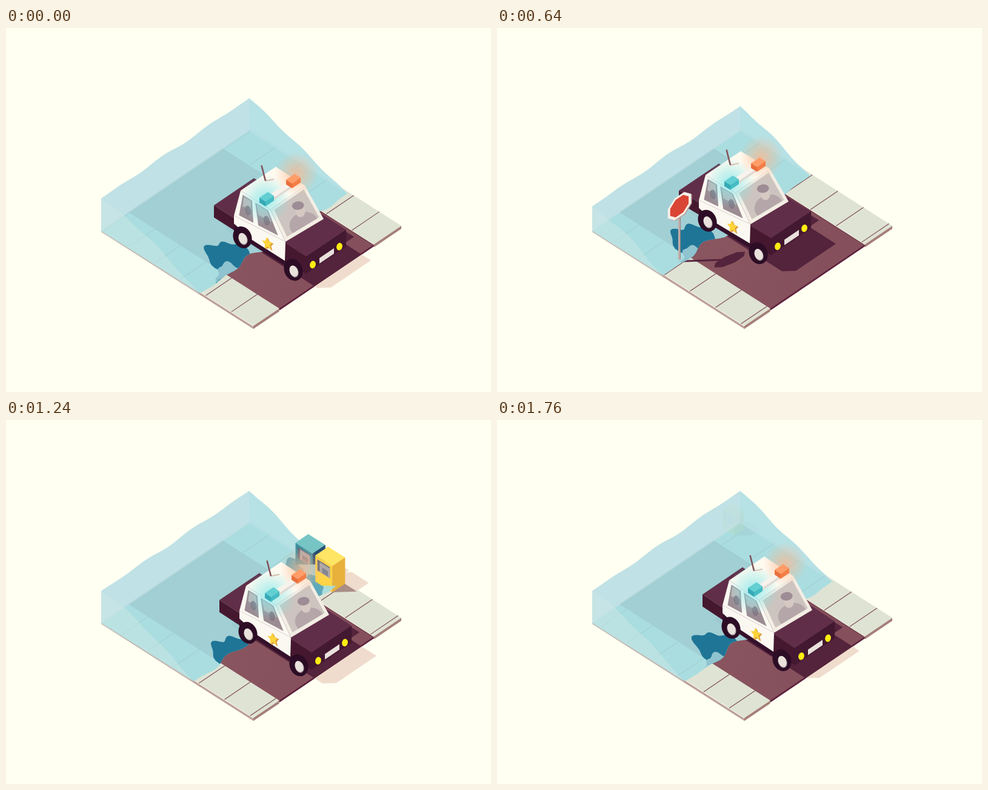
These frames come from a looping animation (800 px wide and 600 px high, 1.8 s). An HTML page with a canvas:

```html
<!DOCTYPE html>
<html lang="en">
<head>
<meta charset="utf-8">
<title>Flooded street patrol</title>
<style>
html, body { margin: 0; width: 100%; height: 100%; overflow: hidden; background: #fffff2; }
canvas { display: block; width: 800px; height: 600px; }
</style>
</head>
<body>
<canvas id="stage" width="800" height="600"></canvas>
<script>
const ctx = document.getElementById('stage').getContext('2d');
const LOOP = 1800, STEP = 40, TAU = Math.PI * 2;
const SPEED = 0.0011205;          // street travel, tile lengths per ms
const SLAB = SPEED * LOOP / 12;
const CURB_L = 0.175, CURB_R = 0.815;

const clamp = x => Math.max(0, Math.min(1, x));
const mix = (p, q, k) => [p[0] + (q[0] - p[0]) * k, p[1] + (q[1] - p[1]) * k];

// Tile: u runs along the street, v across it, z is up in pixels
const P = (u, v, z = 0) => [157 + 251 * u + 244 * v, 335 + 160 * u - 165 * v - z];

// Object space in pixels: a forward, b across, z up; pitch dips the front
const iso = ([x, y], pitch = 0) => (a, b, z = 0) =>
  [x + a + b, y + 0.637 * a - 0.676 * b - z + pitch * (a + 70) / 75];

// Looping cubic curve through [time, value] pairs
function curve(keys) {
  const n = keys.length;
  const at = i => {
    const turn = Math.floor(i / n), k = keys[i - turn * n];
    return [k[0] + turn * LOOP, k[1]];
  };
  const rate = (p, q) => (q[1] - p[1]) / (q[0] - p[0]);
  const slope = i => {
    const p = at(i - 1), q = at(i), r = at(i + 1);
    const h0 = q[0] - p[0], h1 = r[0] - q[0];
    return (h1 * rate(p, q) + h0 * rate(q, r)) / (h0 + h1);
  };
  return t => {
    let i = n - 1;
    while (i > 0 && keys[i][0] > t) i--;
    const p = at(i), q = at(i + 1), h = q[0] - p[0], s = (t - p[0]) / h, r = 1 - s;
    return p[1] * (1 + 2 * s) * r * r + slope(i) * h * s * r * r +
      q[1] * s * s * (3 - 2 * s) - slope(i + 1) * h * s * s * r;
  };
}
const carMove = curve([[0, 0], [320, -21], [640, -43], [960, -13], [1240, 9], [1560, -33], [1760, -4]]);
const carPitch = curve([[0, 0], [320, 3], [640, -3], [960, 2], [1240, 1], [1560, 3], [1760, 2]]);
const depth = curve([[0, 54], [320, 39.5], [640, 41], [960, 74], [1120, 71], [1240, 53], [1560, 29], [1760, 53]]);
const reach = curve([[0, 0.65], [320, 0.48], [640, 0.465], [960, 0.82], [1240, 0.61], [1560, 0.335], [1760, 0.61]]);

function trace(pts) {
  ctx.beginPath();
  pts.forEach(p => ctx.lineTo(...p));
  ctx.closePath();
}
function fill(pts, color) {
  trace(pts);
  ctx.fillStyle = color;
  ctx.fill();
}
function line(p, q, color, width) {
  ctx.beginPath();
  ctx.moveTo(...p);
  ctx.lineTo(...q);
  ctx.strokeStyle = color;
  ctx.lineWidth = width;
  ctx.stroke();
}
function oval([x, y], rx, ry, turn, color) {
  ctx.beginPath();
  ctx.ellipse(x, y, rx, ry, turn, 0, TAU);
  ctx.fillStyle = color;
  ctx.fill();
}
function glow([x, y], r, rgb, alpha) {
  const g = ctx.createRadialGradient(x, y, 0, x, y, r);
  g.addColorStop(0, `rgba(${rgb},${alpha})`);
  g.addColorStop(1, `rgba(${rgb},0)`);
  oval([x, y], r, r, 0, g);
}
function saved(draw) {
  ctx.save();
  draw();
  ctx.restore();
}
function within(pts, draw) {
  saved(() => {
    trace(pts);
    ctx.clip();
    draw();
  });
}
function random(seed) {
  return () => (seed = (seed * 16807) % 2147483647) / 2147483647;
}

// Wavering oval, used for reflections on the water
function ripple([x, y], rx, ry, turn, phase, color) {
  const pts = [];
  for (let i = 0; i < 48; i++) {
    const k = i / 48 * TAU, r = 1 + 0.14 * Math.sin(3 * k + phase) + 0.09 * Math.sin(7 * k - phase);
    const dx = rx * r * Math.cos(k), dy = ry * r * Math.sin(k);
    pts.push([x + dx * Math.cos(turn) - dy * Math.sin(turn), y + dx * Math.sin(turn) + dy * Math.cos(turn)]);
  }
  fill(pts, color);
}

// The three visible faces of a block
function block(at, [a0, a1], [b0, b1], [z0, z1], [top, side, front]) {
  fill([at(a0, b0, z1), at(a0, b1, z1), at(a1, b1, z1), at(a1, b0, z1)], top);
  fill([at(a0, b0, z1), at(a1, b0, z1), at(a1, b0, z0), at(a0, b0, z0)], side);
  fill([at(a1, b0, z1), at(a1, b1, z1), at(a1, b1, z0), at(a1, b0, z0)], front);
}

// Point and inset panel on a four-cornered face
const onFace = (q, s, t) => mix(mix(q[0], q[1], s), mix(q[3], q[2], s), t);
const panel = (q, s0, s1, t0, t1) =>
  [onFace(q, s0, t0), onFace(q, s1, t0), onFace(q, s1, t1), onFace(q, s0, t1)];

function hull(pts) {
  const half = list => list.reduce((h, p) => {
    const left = (o, q) => (q[0] - o[0]) * (p[1] - o[1]) - (q[1] - o[1]) * (p[0] - o[0]);
    while (h.length > 1 && left(h[h.length - 2], h[h.length - 1]) <= 0) h.pop();
    return [...h, p];
  }, []).slice(0, -1);
  const sorted = [...pts].sort((p, q) => p[0] - q[0] || p[1] - q[1]);
  return [...half(sorted), ...half(sorted.reverse())];
}

// The sun lies low on the left
const cast = at => (a, b, z) => {
  const [x, y] = at(a, b);
  return [x + 0.91 * z, y - 0.03 * z];
};
function blockShadow(at, as, bs, zs, color) {
  const pts = [];
  for (const a of as) for (const b of bs) for (const z of zs) pts.push(cast(at)(a, b, z));
  fill(hull(pts), color);
}

const tile = [P(0, 0), P(0, 1), P(1, 1, 1), P(1, 0, 1)];

// One shape, pale on the ground around the tile and dark on the tile
function shadow(shape, dark) {
  saved(() => {
    trace(tile);
    ctx.rect(0, 0, 800, 600);
    ctx.clip('evenodd');
    shape('#f0dccd');
  });
  within(tile, () => shape(dark));
}

function street(t) {
  const strip = (v0, v1, z, color) => fill([P(0, v0, z), P(0, v1, z), P(1, v1, z), P(1, v0, z)], color);
  const g = ctx.createLinearGradient(280, 330, 530, 420);
  g.addColorStop(0, '#8b5760');
  g.addColorStop(1, '#85505c');
  strip(CURB_L, CURB_R, 2, g);
  line(P(1, CURB_L, 2), P(1, CURB_R, 2), '#5b1f3b', 2.5);
  const first = ((0.665 - (t - 320) * SPEED) % SLAB + SLAB) % SLAB;
  for (const [v0, v1] of [[0, CURB_L], [CURB_R, 1]]) {
    fill([P(1, v0, 4), P(1, v1, 4), P(1, v1, -1), P(1, v0, -1)], '#a57f79');
    strip(v0, v1, 4, '#dfe3d4');
    for (let u = first; u < 1; u += SLAB) line(P(u, v0, 4), P(u, v1, 4), '#7d4f57', 1.2);
  }
  fill([P(0, 0, 3), P(1, 0, 3), P(1, 0, -1), P(0, 0, -1)], '#bca099');
  line(P(0, CURB_R, 2), P(1, CURB_R, 2), '#77434f', 2);
}

function makeWater(t) {
  const H = depth(t), U = reach(t), w = TAU * t / LOOP;
  const end = v => U + Math.sin(Math.PI * v) *
    (0.02 * Math.sin(v * 15 + 3 * w) + 0.018 * Math.sin(v * 31 - 2 * w));
  const rise = (u, v) => {
    const s = clamp(u / end(v));
    const chop = 2.4 * Math.sin(u * 21 + v * 13 + 4 * w) + 1.5 * Math.sin(u * 9 - v * 24 - 3 * w);
    const crest = 2 * Math.sin(v * 19 + 2 * w) * Math.sin(Math.PI * v) * (1 - s);
    return Math.max(0, H * (1 - Math.pow(s, 1.6 - 0.5 * v)) + chop * Math.sin(Math.PI * s) + crest);
  };
  const along = f => Array.from({ length: 41 }, (_, i) => f(i / 40));
  const edge = v => along(k => P(k * end(v), v, rise(k * end(v), v)));
  const left = edge(0), right = edge(1);
  const back = along(k => P(0, k, rise(0, k)));
  const front = along(k => P(end(1 - k), 1 - k, 2));
  return { U, rise, left, right, back, body: [...back, ...right, ...front, P(0, 0)] };
}

function drawWater({ body, back, left, right }) {
  fill(body, 'rgba(165,221,226,0.9)');
  fill([...back, P(0, 1), P(0, 0)], 'rgba(205,227,232,0.6)');
  fill([...right, P(0, 1)], 'rgba(196,226,229,0.4)');
  fill([...left, P(0, 0)], 'rgba(206,232,230,0.5)');
}

// Shade and mirrored paintwork on the water beside the car
function mirror(water, at, t) {
  const phase = TAU * t / LOOP * 3;
  within(water.body, () => {
    ripple(at(-94, -26), 48, 27, 0.65, phase, '#1f7596');
    ripple(at(-77, -46), 27, 20, 0.5, phase + 2, '#8fc3cf');
    ripple(at(-71, -37), 8, 6, 0.4, phase, '#33819f');
    ripple(at(-79, -55), 14, 5, -0.2, phase, '#579fb5');
  });
}

function newsBox({ at, size, colors }) {
  const s = z => z * size;
  block(at, [s(-28), 0], [0, s(21)], [0, s(43)], colors);
  const face = [at(s(-28), 0, s(43)), at(0, 0, s(43)), at(0, 0), at(s(-28), 0)];
  fill(panel(face, 0.12, 0.86, 0.1, 0.52), '#62697a');
  fill(panel(face, 0.26, 0.86, 0.14, 0.52), '#aea8a8');
  fill(panel(face, 0.4, 0.75, 0.3, 0.5), '#85858f');
}

function octagon(r) {
  return Array.from({ length: 8 }, (_, i) => {
    const k = (i + 0.5) * TAU / 8;
    return [r * 1.06 * Math.cos(k), 91 + r * Math.sin(k)];
  });
}
function sign(at, size) {
  const face = (r, shift) => octagon(r).map(([b, z]) => at(shift, b * size, z * size));
  line(at(0, 0), at(0, 0, 76 * size), '#a18584', 4);
  line(at(-0.6, 0), at(-0.6, 0, 76 * size), '#cdbdb8', 2);
  fill(face(19.5, 1.5), '#b9a29d');
  fill(face(19.5, 0), '#f5efe8');
  fill(face(15.5, 0), '#da4435');
}
function signShadow(at, size, color) {
  const to = cast(at);
  line(to(0, 0, 0), to(0, 0, 76 * size), color, 3);
  fill(octagon(19).map(([b, z]) => to(0, b * size, z * size)), color);
}

function star([x, y], r, color) {
  fill(Array.from({ length: 10 }, (_, i) => {
    const k = -Math.PI / 2 - 0.12 + i * Math.PI / 5, d = i % 2 ? r * 0.48 : r;
    const dx = 0.85 * d * Math.cos(k);
    return [x + dx, y + d * Math.sin(k) + dx * 0.35];
  }), color);
}

function wheel(at, a) {
  oval(at(a, 0, 17), 15, 18.5, -0.4, '#2c0d25');
  oval(at(a + 1, 0, 15), 7, 10, -0.4, '#b9aeb0');
  oval(at(a + 0.5, 0, 15.5), 6.3, 9.3, -0.4, '#e9e2dc');
}

const WIDTH = [0, 66];

function carShadow(at, color) {
  blockShadow(at, [-152, 0], WIDTH, [20, 45], color);
  blockShadow(at, [-112, -63], [4, 62], [20, 88], color);
}

function car(road, at, flood) {
  const plum = ['#602e48', '#45182f', '#431831'];
  block(at, [-152 + 9 * flood, -90], WIDTH, [20, 40], plum);
  block(at, [-119, -20], WIDTH, [15, 26], ['#35102a', '#35102a', '#35102a']);
  block(at, [-40, 0], WIDTH, [24, 52], plum);

  const rl = at(-112, 4, 87), rr = at(-112, 62, 87), fl = at(-63, 4, 87), fr = at(-63, 61, 88);
  const base = at(-34, 0, 55), far = at(-34, 63, 50), tail = at(-119, 0, 44);
  const side = [rl, fl, base, tail], screen = [fl, fr, far, base];

  fill([tail, base, at(-35, 0, 23), at(-90, 0, 23), at(-119, 0, 31)], '#fbf8f1');
  fill(side, '#fbf8f1');
  for (const [s0, s1] of [[0.09, 0.38], [0.48, 0.88]]) {
    fill(panel(side, s0, s1, 0.1, 0.9), '#9b8b92');
    fill(panel(side, s0 + 0.04, s1 - 0.04, 0.14, 0.5), '#c0b5b4');
    oval(onFace(side, (s0 + s1) / 2 + 0.03, 0.55), 5, 8, -0.2, '#85747f');
  }
  fill(screen, '#f3eee4');
  const glass = panel(screen, 0.08, 0.93, 0.07, 0.9);
  fill(glass, '#cdc4bf');
  within(glass, () => {
    oval(onFace(screen, 0.55, 0.85), 24, 20, -0.3, '#b5a6aa');
    oval(onFace(screen, 0.62, 0.5), 8, 10, 0, '#d6c9c3');
    oval(onFace(screen, 0.63, 0.34), 10, 7, -0.1, '#9d8c95');
  });
  fill([rl, rr, fr, fl], '#fffaf0');

  glow(at(-76, 8, 92), 42, '125,230,235', 0.75);
  glow(at(-78, 62, 97), 36, '255,182,140', 0.75);
  block(at, [-79, -72], [18, 48], [87, 91], ['#f7f3ec', '#e4ded6', '#dfd9d2']);
  block(at, [-81, -71], [4, 18], [87, 95], ['#62cfd2', '#36a9b5', '#45bcc4']);
  block(at, [-81, -71], [48, 62], [87, 95], ['#ff9d68', '#e96f3c', '#f47d45']);
  const mast = at(-103, 36, 87);
  line(mast, at(-98, 45, 87), '#d9c0ae', 2);
  line(mast, at(-106, 32.5, 113), '#82545a', 2.6);

  wheel(road, -105);
  wheel(road, -21);
  star(at(-62, 0, 32.5), 11, '#d79c3b');
  star(at(-64, 0, 33), 10.5, '#ffd43b');
  for (const b of [11, 55]) oval(at(0, b, 31.5), 4.8, 6.3, 0.25, '#ffed12');
  fill([at(0, 22, 35), at(0, 46, 35), at(0, 46, 26), at(0, 22, 26)], '#e9e1dc');
}

// High water lapping over the flank, with glinting facets
function wash(at, flood) {
  if (!flood) return;
  const lift = 26 * (flood - 1);
  const flank = [at(-143, 0, 41 + lift), at(-117, 0, 30 + lift), at(-82, 0, 26 + lift), at(-37, 0, 22 + lift),
    at(-24, -8, 6), at(-38, -32, 0), at(-80, -44, 0), at(-116, -30, 6)];
  saved(() => {
    ctx.globalAlpha = clamp(flood * 2);
    fill(flank, '#92cbd6');
    within(flank, () => {
      ripple(at(-38, -5, 8), 34, 11, 0.75, 5 * flood, '#15718f');
      const rnd = random(77), tones = ['#4c9bb2', '#74b5c5', '#b3d9de', '#3588a5'];
      for (let i = 0; i < 18; i++) {
        const c = at(-125 + 88 * rnd(), -36 * rnd(), 18), spin = rnd() * TAU + flood;
        fill([0, 1.7, 3.6].map(k => {
          const r = 6 + 9 * rnd();
          return [c[0] + r * Math.cos(spin + k), c[1] + 0.7 * r * Math.sin(spin + k)];
        }), tones[i % 4]);
      }
    });
  });
}

// Street furniture pops in at the front and shrinks away at the back
const sizeAt = u => Math.min(clamp((1 - u) / 0.04), clamp((u + 0.06) / 0.09));

function frame(t) {
  ctx.fillStyle = '#fffff2';
  ctx.fillRect(0, 0, 800, 600);

  const water = makeWater(t), move = carMove(t);
  const ground = [495 + move, 429 + 0.637 * move];
  const road = iso(ground), at = iso(ground, carPitch(t));
  const flood = clamp((water.U - 0.67) / 0.14);
  const level = (u, v) => u < water.U ? water.rise(Math.max(0, u), v) : 0;

  const signU = 0.804 - (t - 320) * SPEED, signSize = sizeAt(signU);
  const signAt = iso(P(signU, 0.1315));
  const boxU = 0.9 - (t - 960) * SPEED;
  const boxes = [
    { u: boxU - 0.13, colors: ['#76c5c4', '#3f919f', '#294f70'] },
    { u: boxU, colors: ['#ffe564', '#ffd447', '#e7b13b'] }
  ].map(b => {
    const base = P(b.u + 0.041, 0.917);
    return { ...b, base, size: sizeAt(b.u), at: iso(base) };
  }).filter(b => b.size > 0);

  // Keeps only what stands above the water
  const above = (y, draw) => within([[0, 0], [800, 0], [800, y], [0, y]], draw);

  street(t);
  shadow(c => carShadow(road, c), '#54233c');
  for (const b of boxes) {
    shadow(c => blockShadow(b.at, [-28 * b.size, 0], [0, 21 * b.size], [0, 43 * b.size], c), '#a98d86');
  }
  if (signSize) shadow(c => signShadow(signAt, signSize, c), '#54233c');
  boxes.forEach(newsBox);
  if (signSize) sign(signAt, signSize);

  drawWater(water);
  if (signSize && signU < 0.35) {
    oval(signAt(-15, 46, 20), 30, 15, 0, 'rgba(145,185,192,0.35)');
    ripple(signAt(-4, -4, 56), 5, 13, 0.3, 0, 'rgba(82,151,169,0.8)');
  }
  mirror(water, road, t);
  for (const b of boxes) {
    const h = level(b.u, 0.94);
    if (h > 0 && h < 45) {
      within(water.body, () => ripple(b.at(-22, -12, h * 0.5), 18, 20, 0.4, t / 90, 'rgba(70,152,174,0.75)'));
    }
    above(h ? b.base[1] - 8 - h : 600, () => newsBox(b));
  }

  car(road, at, flood);
  wash(at, flood);
  if (signSize) {
    const h = level(signU, 0.13);
    above(h ? signAt(0, 0, h)[1] : 600, () => sign(signAt, signSize));
  }
}

const start = performance.now();
function tick(now) {
  const t = Math.max(0, now - start) % LOOP;
  frame(Math.floor(t / STEP) * STEP);
  requestAnimationFrame(tick);
}
frame(0);
requestAnimationFrame(tick);
</script>
</body>
</html>
```
